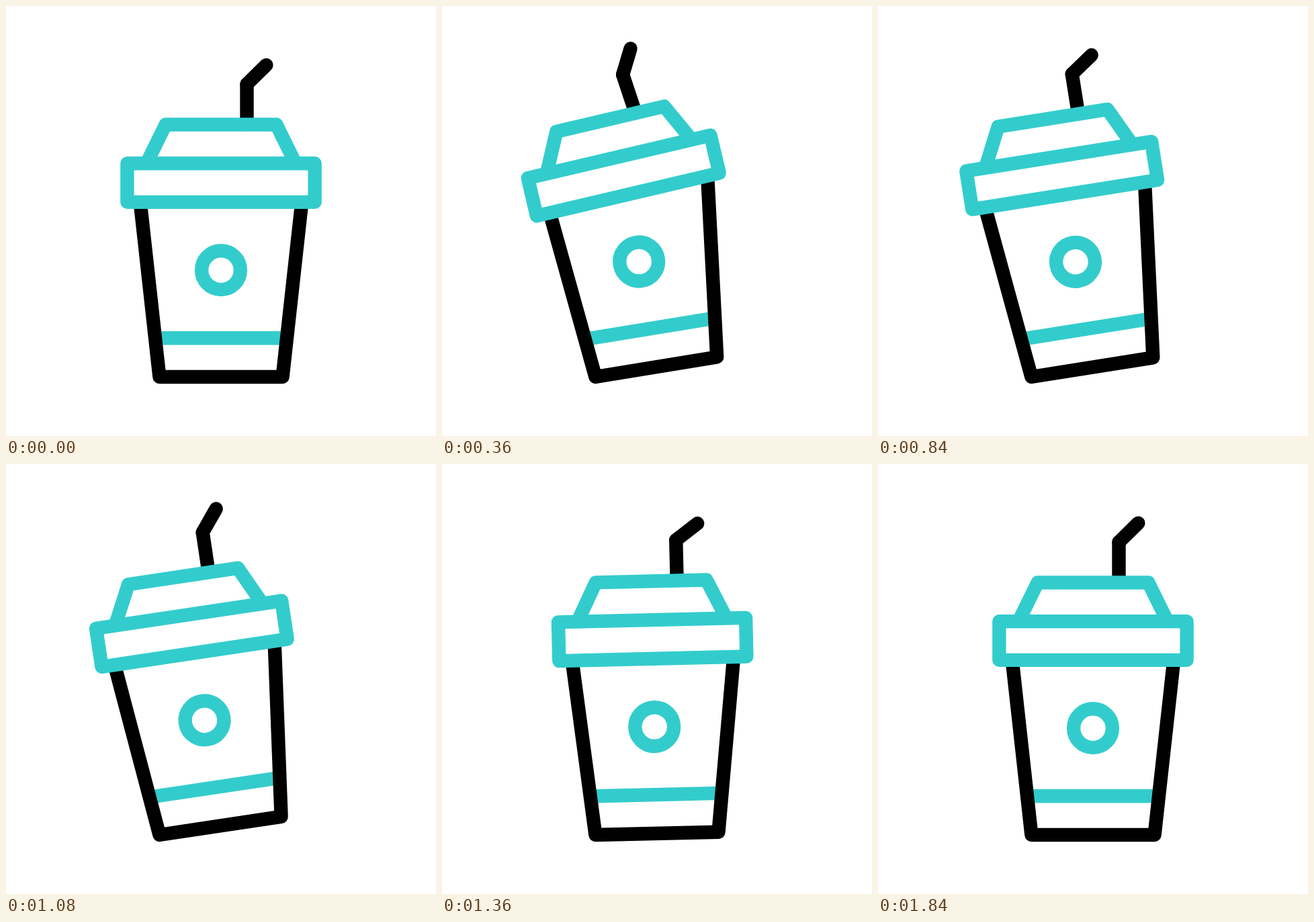
Recreate the animation shown at these times as an HTML page with a canvas. Size 640 by 640 pixels, loop 1960 ms.

```html
<!DOCTYPE html>
<html lang="en">
<head>
<meta charset="utf-8">
<title>Tilting cup</title>
<style>
  html, body { margin: 0; width: 100%; height: 100%; overflow: hidden; background: #fff; }
  canvas { display: block; width: 100vw; height: 100vh; }
</style>
</head>
<body>
<canvas id="stage"></canvas>
<script>
const canvas = document.getElementById('stage');
const ctx = canvas.getContext('2d');
const SIZE = 640, LOOP = 1960, STEP = 40;
const TEAL = '#33cccc', BLACK = '#000', LINE = 20.4;
const ratio = window.devicePixelRatio || 1;
canvas.width = canvas.height = SIZE * ratio;

const smooth = u => u * u * (3 - 2 * u);

// Eased value between [time, value] keys.
function track(keys, t) {
  if (t <= keys[0][0]) return keys[0][1];
  for (let i = 1; i < keys.length; i++) {
    const [t0, v0] = keys[i - 1], [t1, v1] = keys[i];
    if (t < t1) return v0 + (v1 - v0) * smooth((t - t0) / (t1 - t0));
  }
  return keys[keys.length - 1][1];
}

// Angles in degrees, counter-clockwise; each is relative to its parent part.
const TILT = [[120, 0], [440, 11], [637, 9]];
const LID = [[240, 0], [460, 6.9], [720, 0]];
const STRAW = [[240, 0], [460, 9], [720, 0]];
const TIP = [[220, 0], [500, 21.5], [800, -10], [1150, 9.5], [1200, 9], [1350, -8], [1590, 3], [1840, 0]];
const DROP = 1020, LAND = 1273, REST = 1469;

// The cup rises and settles, then falls back and bounces once.
function tiltAt(t) {
  if (t < DROP) return track(TILT, t);
  if (t < LAND) return 9 * (1 - ((t - DROP) / (LAND - DROP)) ** 2);
  if (t < REST) {
    const u = (t - LAND) / (REST - LAND);
    return 1.36 * 4 * u * (1 - u);
  }
  return 0;
}

function turn(deg, x, y) {
  ctx.translate(x, y);
  ctx.rotate(-deg * Math.PI / 180);
  ctx.translate(-x, -y);
}

function line(color, points, closed) {
  ctx.beginPath();
  for (const [x, y] of points) ctx.lineTo(x, y);
  if (closed) ctx.closePath();
  ctx.strokeStyle = color;
  ctx.stroke();
}

function drawBody() {
  line(TEAL, [[223, 494.3], [417, 494.3]]);
  line(BLACK, [[199.7, 292], [228.4, 552], [411.6, 552], [440.3, 292]]);
  ctx.beginPath();
  ctx.arc(320, 393.2, 28.9, 0, Math.PI * 2);
  ctx.strokeStyle = TEAL;
  ctx.stroke();
}

function drawStraw(t) {
  const bend = [358.5, 116.2];
  ctx.save();
  turn(track(STRAW, t), 358.5, 176);
  line(BLACK, [[358.5, 176], bend]);
  turn(track(TIP, t), ...bend);
  line(BLACK, [bend, [387.4, 87.9]]);
  ctx.restore();
}

function drawLid() {
  line(TEAL, [[209.2, 234.2], [237.6, 176.5], [402.4, 176.5], [430.8, 234.2]]);
  ctx.fillStyle = '#fff';
  ctx.fillRect(180.4, 234.2, 279.2, 57.7);
  line(TEAL, [[180.4, 234.2], [459.6, 234.2], [459.6, 291.9], [180.4, 291.9]], true);
}

function draw(t) {
  ctx.setTransform(ratio, 0, 0, ratio, 0, 0);
  ctx.fillStyle = '#fff';
  ctx.fillRect(0, 0, SIZE, SIZE);
  ctx.lineWidth = LINE;
  ctx.lineCap = ctx.lineJoin = 'round';
  turn(tiltAt(t), 228.4, 552);
  drawBody();
  turn(track(LID, t), 320, 292);
  drawStraw(t);
  drawLid();
}

const start = performance.now();
function tick() {
  const t = (performance.now() - start) % LOOP;
  draw(Math.floor(t / STEP) * STEP);
  requestAnimationFrame(tick);
}
tick();
</script>
</body>
</html>
```
